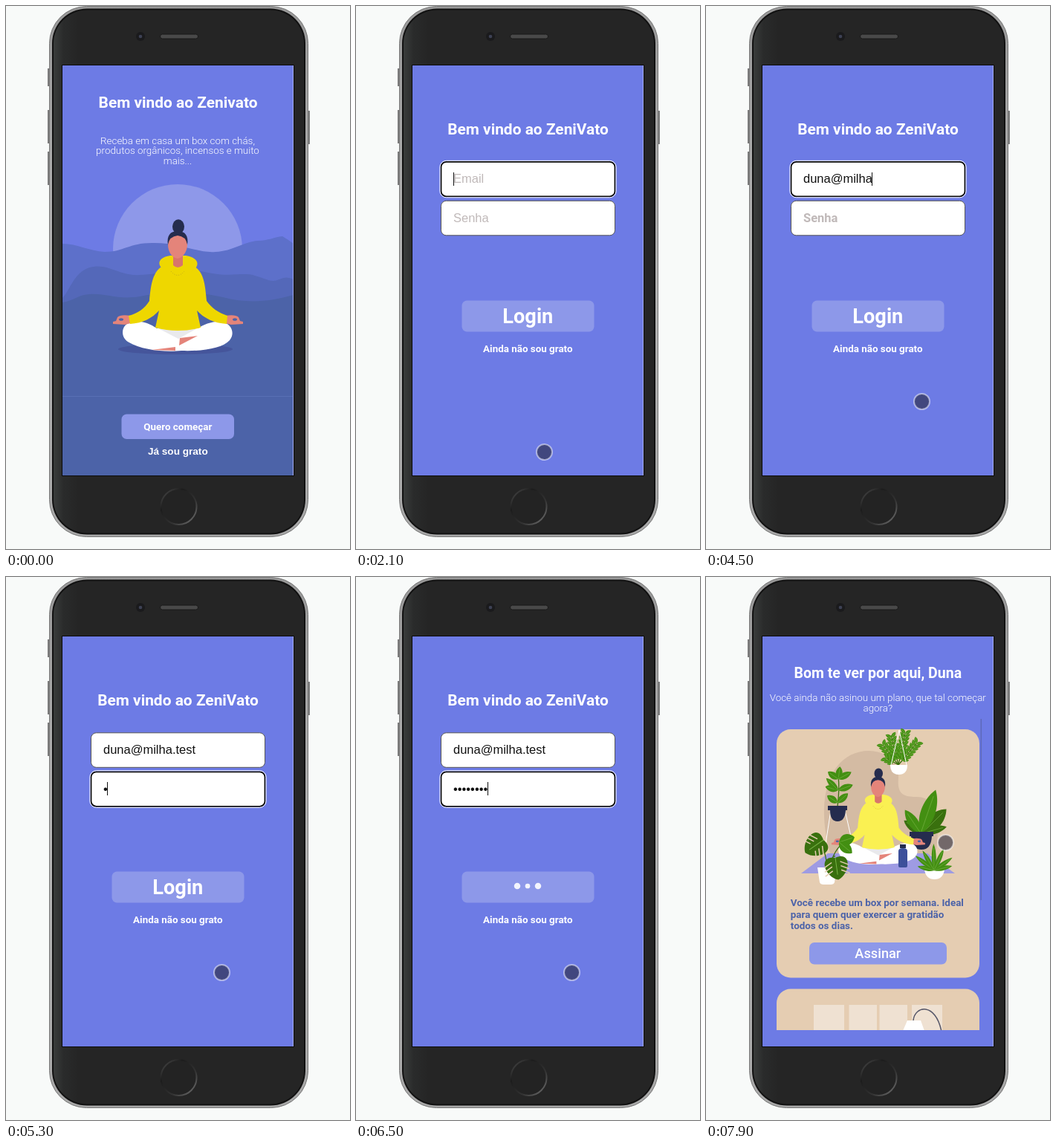
An HTML page for the animation above (8 s loop, 463x731 px).

```html
<!DOCTYPE html>
<html lang="pt">
<head>
<meta charset="utf-8">
<style>
  html, body { margin: 0; width: 100%; height: 100%; overflow: hidden; background: #f8faf9; }
  svg { display: block; }
  text { font: 700 13.4px Roboto, sans-serif; fill: #fff; }
  .mid { text-anchor: middle; }
  .light { font-weight: 300; }
  .title { font-size: 20.9px; }
  .field { font: 400 16.5px "Liberation Sans", sans-serif; fill: #111; }
  .hint { fill: #c0b9b9; }
  .hint.loaded { font: 700 16.5px Roboto, sans-serif; }
  .box { fill: #fff; stroke: #555; }
  .box.focus { stroke: #080808; stroke-width: 1.8; }
  .halo { fill: none; stroke: #fff; }
  .button { fill: #8d98e9; }
</style>
</head>
<body>
<svg width="463" height="731" viewBox="0 0 463 731">
  <defs>
    <linearGradient id="metal" x2="0" y2="1">
      <stop stop-color="#999"/><stop offset=".5" stop-color="#b5b5b5"/><stop offset="1" stop-color="#a8a8a8"/>
    </linearGradient>
    <linearGradient id="glass">
      <stop stop-color="#3a3d3c"/><stop offset=".04" stop-color="#2a2b2b"/><stop offset=".1" stop-color="#252525"/>
    </linearGradient>
    <linearGradient id="ring" x2="1" y2="1">
      <stop stop-color="#555"/><stop offset=".3" stop-color="#1c1c1c"/><stop offset=".65" stop-color="#333"/><stop offset="1" stop-color="#777"/>
    </linearGradient>
    <clipPath id="screen"><path d="M76 80h311v552H76z"/></clipPath>
    <clipPath id="list"><path d="M76 190h311v420H76z"/></clipPath>
    <g id="woman">
      <path fill="#fff" d="M170 425C155 428 153 444 164 452C184 464 215 466 236 464C264 465 291 461 301 450C309 440 303 427 290 425C278 424 266 429 258 434H203C193 427 181 423 170 425Z"/>
      <path fill="#e9e9ec" d="M203 433Q232 430 259 433L232 448Z"/>
      <path fill="#e4847a" d="M234 447L258 444L233 457ZM196 463L228 459V464Z"/>
      <g id="hand">
        <path fill="#e4847a" d="M168 417Q154 415 150 419L148 424L144 425V428L160 429L168 427Z"/>
        <ellipse cx="155" cy="422" rx="3" ry="1.8" fill="#4c63a9"/>
      </g>
      <use href="#hand" transform="matrix(-1 0 0 1 463 0)"/>
      <path fill="currentColor" d="M211 350C198 357 195 374 193 397C187 407 177 414 165 417L167 428C184 427 197 420 206 410L201 433Q231 441 262 433L257 410C266 420 280 427 297 428L298 417C286 413 276 406 270 397C268 374 266 357 252 350Z"/>
      <path fill="currentColor" d="M221 336C206 338 203 347 210 353C217 361 225 363 232 363C240 363 248 360 255 353C261 346 256 338 242 336Z"/>
      <path fill="none" stroke="#c2aa20" stroke-dasharray="1 2" d="M222 357Q231 368 240 357"/>
      <path fill="#d8756c" d="M225 333H238V349Q231 355 225 349Z"/>
      <path fill="#252c4e" d="M218 322C216 309 221 303 231 303S246 309 244 322Z"/>
      <ellipse cx="232" cy="297" rx="8" ry="9.7" fill="#252c4e"/>
      <path fill="#e4847a" d="M218 321Q220 310 231 309Q242 310 244 321C244 332 237 339 231 340C224 339 218 332 218 321Z"/>
    </g>
  </defs>

  <g fill="#7c7c7c">
    <path d="M56 84h4v24h-4zM56 140h4v45h-4zM56 196h4v45h-4zM405 141h4v45h-4z"/>
  </g>
  <rect x="58.5" y=".5" width="348" height="714" rx="50" fill="url(#metal)" stroke="#777"/>
  <rect x="62" y="3.5" width="341" height="708" rx="47" fill="#111"/>
  <rect x="64" y="5.5" width="337" height="704" rx="45" fill="url(#glass)"/>
  <circle cx="181" cy="41" r="6" fill="#1a1a1c"/><circle cx="181" cy="41" r="2.3" fill="#3d4154"/>
  <rect x="207.5" y="38" width="51" height="6" rx="3" fill="#494949" stroke="#191919"/>
  <circle cx="232.5" cy="674" r="24" fill="#232323" stroke="url(#ring)" stroke-width="2"/>
  <path fill="#0b0b0b" d="M75 79h313v554H75z"/>

  <g clip-path="url(#screen)">
    <path fill="#6d7be5" d="M76 80h311v552H76z"/>

    <g id="welcome">
      <circle cx="231" cy="327" r="87" fill="#8e98e9"/>
      <path fill="#5d70ca" d="M76 320C96 320 112 330 133 331C158 331 166 319 196 319C236 318 256 333 282 331C306 330 320 317 339 316C352 316 362 311 372 310Q379 314 387 320V632H76Z"/>
      <path fill="#5468b9" d="M76 393C86 384 92 354 118 351C140 348 154 364 180 362C210 361 240 351 272 359C300 365 318 359 332 362C350 367 356 373 368 368Q377 363 387 368V632H76Z"/>
      <path fill="#4c63a8" d="M76 399C91 397 96 389 112 388C134 386 150 396 180 391C220 383 260 385 292 392C326 401 354 398 387 389V632H76Z"/>
      <path stroke="#5870b5" d="M76 525.5h311"/>
      <ellipse cx="228" cy="462" rx="77" ry="7" fill="#45559b"/>
      <use href="#woman" color="#eed700"/>
      <text class="mid title" x="231.5" y="137">Bem vindo ao Zenivato</text>
      <text class="mid light" x="231" y="186">Receba em casa um box com chás,</text>
      <text class="mid light" x="231" y="199.3">produtos orgânicos, incensos e muito</text>
      <text class="mid light" x="231" y="213">mais...</text>
      <rect class="button" x="155.5" y="549.5" width="151.5" height="33.5" rx="7"/>
      <text class="mid" x="231.3" y="571.3">Quero começar</text>
      <text class="mid" x="231.3" y="604.3" style="font-family:'Liberation Sans',sans-serif;font-size:13.6px">Já sou grato</text>
    </g>

    <g id="login">
      <text class="mid title" x="231.5" y="173">Bem vindo ao ZeniVato</text>
      <rect class="box" x="114.5" y="209.8" width="234" height="46.5" rx="7"/>
      <rect class="box" x="114.5" y="262.3" width="234" height="46.5" rx="7"/>
      <rect class="halo" id="halo" x="113" width="237" height="49.5" rx="8.5"/>
      <text class="field hint" x="131" y="238">Email</text>
      <text class="field hint" x="131" y="291">Senha</text>
      <text class="field" id="email" x="131" y="238"></text>
      <text class="field" id="password" x="131" y="291"></text>
      <path id="caret" stroke="#111" d="M.5 0v18"/>
      <rect class="button" x="142.5" y="396.5" width="178" height="42" rx="7"/>
      <text class="mid" id="loginLabel" x="231.3" y="427" style="font-size:27.2px">Login</text>
      <g id="dots" fill="#f3f4fd">
        <circle cx="217" cy="416"/><circle cx="231" cy="416"/><circle cx="245" cy="416"/>
      </g>
      <text class="mid" x="231.3" y="466">Ainda não sou grato</text>
    </g>

    <g id="home">
      <text class="mid" x="231.3" y="135.8" style="font-size:19.5px">Bom te ver por aqui, Duna</text>
      <text class="mid light" x="231.3" y="167">Você ainda não asinou um plano, que tal começar</text>
      <text class="mid light" x="231.3" y="181">agora?</text>
      <path stroke="#5f69b8" stroke-width="1.5" d="M370.3 191V435"/>
      <g clip-path="url(#list)">
        <rect x="95" y="205" width="273" height="334.5" rx="19" fill="#e5cdb2"/>
        <rect x="95" y="554.5" width="273" height="100" rx="19" fill="#e5cdb2"/>
        <path fill="#efe1d2" d="M145 576h41v40h-41zM192.500 576h37.500v40h-37.500zM233.500 576h37.500v40h-37.500zM277 576h41v40h-41z"/>
        <path fill="none" stroke="#555668" stroke-width="1.5" d="M279 597C281 577 309 572 317 612"/>
        <path fill="#fff" d="M271 597h18l5 14h-29z"/>
      </g>
      <path fill="#d4bba3" d="M168 374C157 340 156 301 165 277C174 249 195 234 219 234C246 235 259 250 259 270C257 292 265 296 283 296C309 296 317 319 309 374Z"/>
      <path fill="#9e9be3" d="M164 372H298L335 399H128Z"/>
      <g id="backPlants"></g>
      <path fill="none" stroke="#fff" d="M249 253L260 206L270 253M168 314L159 372M187 314L197 358"/>
      <path fill="#252c4e" d="M164 308h26v6h-2q-1 15-11 15t-10-15h-3zM274 343h32v6h-2q-1 18-14 18t-14-18h-2z"/>
      <path fill="#fff" d="M248 253h23q0 13-11.500 13t-11.500-13"/>
      <use href="#woman" color="#faf052" transform="translate(65.200 47.800) scale(.72 .73)"/>
      <path fill="#3d509a" d="M259 369q0-4 6-4t6 4v20q0 2-2 2h-8q-2 0-2-2z"/>
      <path fill="#252c4e" d="M261 360h8v5h-8z"/>
      <path fill="#fff" d="M150 391h26l-3 20q-1 3-5 3h-10q-4 0-5-3zM294 394h27q-2 13-13.500 13t-13.500-13"/>
      <g id="frontPlants"></g>
      <g id="cardText"></g>
      <rect class="button" x="139" y="492" width="185" height="29.500" rx="7"/>
      <text class="mid" x="231.300" y="513" style="font-size:18.200px;font-weight:500">Assinar</text>
    </g>

    <path stroke="#a4adf0" d="M386.500 80v552"/>
  </g>
  <circle id="cursor" r="10.500" fill="#242538" fill-opacity=".6" stroke="#fff" stroke-opacity=".5" stroke-width="2"/>
</svg>

<script>
const $ = id => document.getElementById(id);
const all = selector => [...document.querySelectorAll(selector)];
const show = (el, on) => { el.style.display = on ? '' : 'none'; };
const GREEN = '#438f12', DARK = '#39700e';

// Pointed leaf growing from its base; angle in degrees.
const leaf = (x, y, angle, length, width, color = GREEN) =>
  `<g transform="translate(${x} ${y}) rotate(${angle})">
    <path fill="${color}" d="M0 0C${length * .25} ${-width} ${length * .7} ${-width} ${length} 0C${length * .7} ${width} ${length * .25} ${width} 0 0"/>
    <path stroke="#79b446" stroke-width=".6" d="M0 0H${length * .85}"/></g>`;

const fan = (x, y, leaves, color) =>
  leaves.map(([angle, length, width]) => leaf(x, y, angle, length, width, color)).join('');

const stem = d => `<path fill="none" stroke="${DARK}" stroke-width="1.300" d="${d}"/>`;

// Straight frond with pairs of small leaves.
function frond(x, y, angle, length) {
  let out = `<g transform="translate(${x} ${y}) rotate(${angle})">` + stem(`M0 0H${length}`);
  for (let d = 8; d <= length; d += 5)
    out += leaf(d, 0, -50, 9, 3) + leaf(d, 0, 50, 9, 3);
  return out + '</g>';
}

// Broad leaf with notches cut in from both sides.
function monstera(x, y, angle, size) {
  let out = `<g transform="translate(${x} ${y}) rotate(${angle})">
    <path fill="${DARK}" d="M0 0C${-size * .3} ${-size} ${size} ${-size * .8} ${size * 1.300} 0C${size} ${size * .8} ${-size * .3} ${size} 0 0"/>
    <path stroke="#79b446" d="M0 0H${size}"/>`;
  for (const side of [-1, 1])
    for (const k of [.25, .5, .75])
      out += `<path stroke="#e5cdb2" stroke-width="1.500" d="M${size * k} ${side * size * .25}L${size * (k + .25)} ${side * size * .72}"/>`;
  return out + '</g>';
}

$('backPlants').innerHTML =
  stem('M177 309Q180 285 178 268') +
  fan(178, 272, [[-82, 17, 6], [-145, 17, 6], [-28, 20, 6]]) +
  fan(178, 287, [[-165, 18, 6], [-20, 21, 6], [-135, 23, 5]]) +
  fan(177, 304, [[-145, 17, 6], [-42, 19, 6]]) +
  [[-128, 34], [-104, 41], [-78, 43], [-50, 39], [-150, 19]].map(f => frond(259, 253, ...f)).join('') +
  fan(291, 345, [[-145, 30, 8], [-45, 46, 13], [-15, 34, 7]], DARK) +
  fan(289, 345, [[-71, 62, 13], [-124, 38, 9]]);

$('frontPlants').innerHTML =
  stem('M163 394Q162 366 150 355M166 394Q171 366 188 356M166 394Q168 375 174 376') +
  monstera(158, 354, 145, 23) + monstera(174, 378, 82, 23) +
  fan(179, 357, [[-18, 22, 10], [40, 23, 9]]) +
  fan(307, 395, [[-142, 32, 4], [-120, 31, 4], [-91, 36, 4], [-66, 32, 4], [-35, 30, 4], [-166, 23, 4], [-14, 25, 4]]);

$('cardText').innerHTML =
  ['Você recebe um box por semana. Ideal', 'para quem quer exercer a gratidão', 'todos os dias.']
    .map((line, i) => `<text x="113.800" y="${443.200 + i * 15.500}" style="fill:#4c63a9">${line}</text>`).join('');

const LOOP = 8000, LOGIN = 2100, FONT_READY = 2200, NEXT_FIELD = 5100, LOADING = 6400, HOME = 6600;
const EMAIL = 'duna@milha.test';
const emailKeys = [3200, 3300, 3400, 3500, 3600, 4100, 4200, 4300, 4400, 4500, 4600, 4800, 4800, 4900, 4900];
const passwordKeys = [5300, 5600, 5700, 5700, 5900, 6000, 6100, 6100];
const typed = (keys, t) => keys.filter(k => k <= t).length;

// Start, end, from x, y, to x, y; the last point is held until the next move.
const moves = [
  [200, 900, 428, 631, 252, 605],
  [1000, 1300, 256, 604.5, 252.5, 603.5],
  [2100, 2300, 253.5, 600.5, 290.5, 532.5],
  [7100, 7100, 402, 417, 402, 417],
  [7500, 7900, 443, 272, 322.5, 357.5]
];

function drawCursor(t) {
  const move = moves.filter(m => m[0] <= t).pop();
  show($('cursor'), move && !(t >= 7200 && t < 7500));
  if (!move) return;
  const [start, end, x0, y0, x1, y1] = move;
  const k = end > start ? Math.min(1, (t - start) / (end - start)) : 1;
  const eased = k * (2 - k);
  $('cursor').setAttribute('transform', `translate(${x0 + (x1 - x0) * eased} ${y0 + (y1 - y0) * eased})`);
}

function drawLogin(t) {
  const second = t >= NEXT_FIELD, loading = t >= LOADING;
  const email = $('email'), password = $('password');
  email.textContent = EMAIL.slice(0, typed(emailKeys, t));
  password.textContent = '•'.repeat(typed(passwordKeys, t));

  all('.hint').forEach((hint, i) => {
    hint.classList.toggle('loaded', t >= FONT_READY);
    show(hint, ![email, password][i].textContent);
  });
  all('.box').forEach((box, i) => box.classList.toggle('focus', i === +second));
  $('halo').setAttribute('y', second ? 260.8 : 208.3);

  const active = second ? password : email;
  const width = active.textContent ? active.getComputedTextLength() : 0;
  $('caret').setAttribute('transform', `translate(${Math.floor(131 + width)} ${second ? 276 : 224})`);
  show($('caret'), t < 2700 || t >= 3100);

  show($('loginLabel'), !loading);
  show($('dots'), loading);
  const pulse = Math.abs(((t - LOADING + 8000) % 800) / 400 - 1);
  all('#dots circle').forEach((dot, i) => dot.setAttribute('r', 2.9 + 1.8 * (i === 1 ? 1 - pulse : pulse)));
}

function draw() {
  const t = Math.floor(performance.now() % LOOP / 100) * 100;
  show($('welcome'), t < LOGIN);
  show($('login'), t >= LOGIN && t < HOME);
  show($('home'), t >= HOME);
  if (t >= LOGIN && t < HOME) drawLogin(t);
  drawCursor(t);
  requestAnimationFrame(draw);
}
draw();
</script>
</body>
</html>
```
